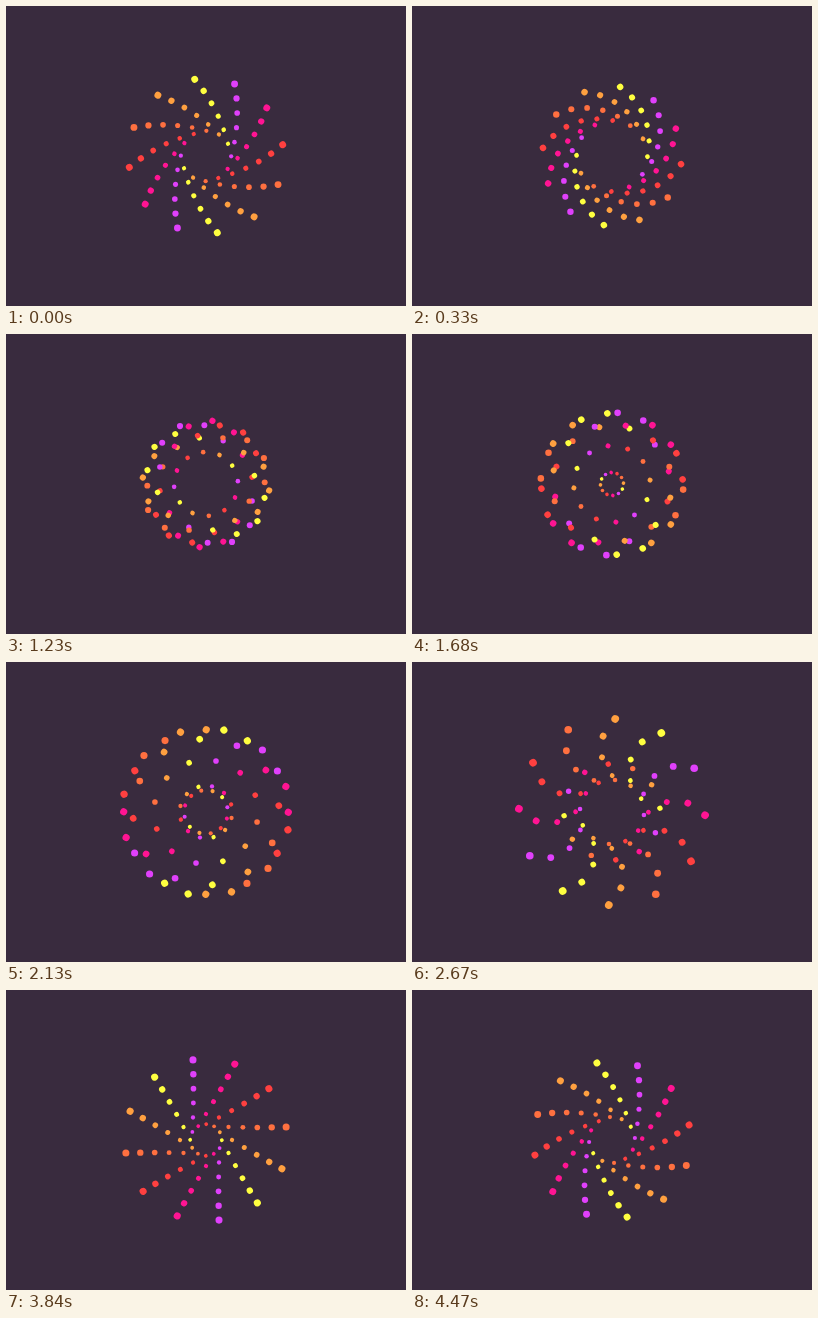
An HTML page with a canvas for the animation above (4.5 s loop, 400 by 300 pixels).

```html
<!DOCTYPE html>
<html>
<head>
<meta charset="utf-8">
<style>
html, body { margin: 0; width: 100%; height: 100%; overflow: hidden; background: #392b3e; }
canvas { display: block; }
</style>
</head>
<body>
<canvas width="400" height="300"></canvas>
<script>
const ctx = document.querySelector('canvas').getContext('2d');
const COLORS = ['#e040fb', '#ff1493', '#ff4040', '#ff7040', '#ffa040', '#ffff40'];
const TAU = Math.PI * 2;
const LOOP = 4500, STEP = 30;
const ARMS = 12, DOTS = 6;
const GAP = 14.4, ORBIT = 46;

// Each arm is an arc of dots: its head orbits a circle while the arc curls up and unrolls.
function armPoints(theta) {
  const curl = TAU / 15 * (1 - Math.cos(theta)) + 1e-6;
  const headX = ORBIT * Math.sin(theta);
  const headY = -2.5 * GAP - ORBIT * Math.cos(theta);
  const dx = GAP / 2 / Math.tan(curl / 2), dy = -2 * GAP;
  return Array.from({ length: DOTS }, (_, k) => {
    const c = Math.cos(k * curl), s = Math.sin(k * curl);
    return [headX - dx + dx * c - dy * s, headY - dy + dx * s + dy * c];
  });
}

function draw(ms) {
  const tick = Math.floor((ms % LOOP) / STEP + 0.1);
  const points = armPoints(TAU * (16 / 150 + tick / 151));
  ctx.setTransform(1, 0, 0, 1, 0, 0);
  ctx.fillStyle = '#392b3e';
  ctx.fillRect(0, 0, 400, 300);
  ctx.translate(200, 150);
  for (let arm = 0; arm < ARMS; arm++) {
    ctx.fillStyle = COLORS[arm % COLORS.length];
    for (const [x, y] of points) {
      ctx.beginPath();
      ctx.arc(x, y, 1.5 + Math.hypot(x, y) / 40, 0, TAU);
      ctx.fill();
    }
    ctx.rotate(TAU / ARMS);
  }
}

const start = performance.now();
function frame() {
  draw(performance.now() - start);
  requestAnimationFrame(frame);
}
frame();
</script>
</body>
</html>
```
